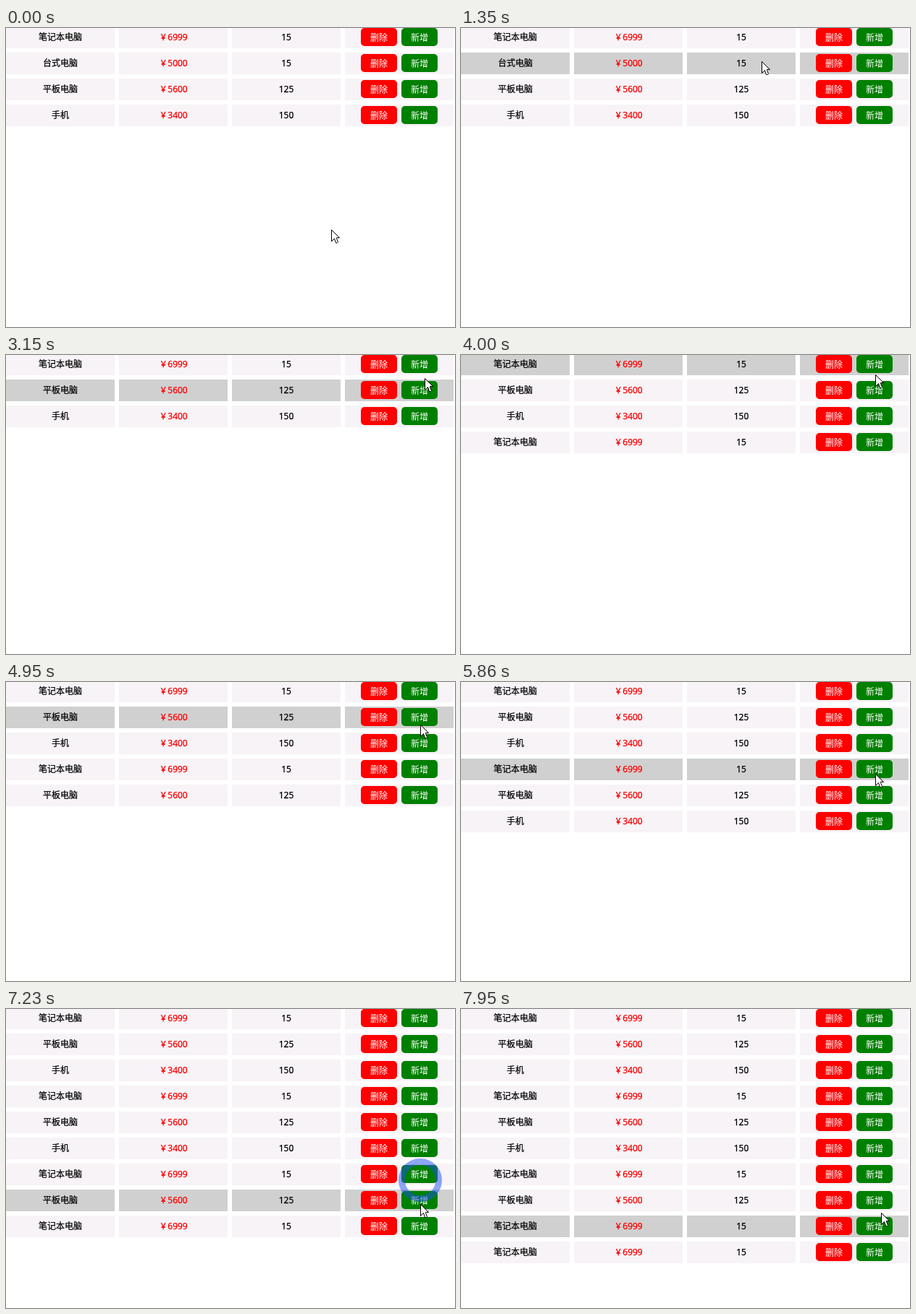
An HTML page that plays this animation: 620x414 px, repeating every 8000 ms.

```html
<!DOCTYPE html>
<html lang="zh-CN">
<head>
<meta charset="utf-8">
<style>
  html, body { margin: 0; width: 100%; height: 100%; overflow: hidden; background: #fff; }
  #stage {
    position: relative; width: 620px; height: 414px; overflow: hidden;
    font: 12px/30px "Noto Sans", "Noto Sans CJK SC", "Noto Sans CJK", sans-serif;
    color: #000; text-align: center; cursor: default;
  }
  .row { position: absolute; left: 0; display: flex; gap: 6px; }
  .cell { position: relative; width: 150px; height: 30px; background: #f7f3f7; -webkit-text-stroke: .25px; }
  .hover .cell { background: #d0d0d0; }
  .price { color: red; }
  .yen { display: inline-block; width: 12px; }
  .btn {
    position: absolute; top: 2px; width: 50px; height: 25px;
    line-height: 27px; border-radius: 5px; color: #fff; -webkit-text-stroke: 0;
  }
  .del { left: 22px; background: red; }
  .add { left: 78px; background: green; }
  svg { position: absolute; left: 0; top: 0; }
</style>
</head>
<body>
<div id="stage">
  <div id="list"></div>
  <svg width="620" height="414">
    <circle id="ripple" fill="none" stroke="#1e50f0" stroke-opacity=".5"/>
    <path id="pointer" d="M.5 .5V16.5L4.5 12.5L6.5 18.5H8.5L9.5 17.5L7.5 12.5V11.5H11.5Z" fill="#fff" stroke="#000"/>
  </svg>
</div>
<script>
const LOOP = 8000, PITCH = 36, TOP = -2, HEIGHT = 30;
const $ = id => document.getElementById(id);

const goods = [
  ['笔记本电脑', 6999, 15],
  ['台式电脑', 5000, 15],
  ['平板电脑', 5600, 125],
  ['手机', 3400, 150]
];

const removal = { at: 2000, row: 1 };
const adds = [[3750, 0], [4460, 1], [5470, 2], [6070, 3], [6510, 4], [7070, 6], [7630, 8]]
  .map(([at, row]) => ({ at, row }));
const clicks = [removal, ...adds];

// The pointer lands a little lower on each of the first rows.
const aimY = row => 13 + row * PITCH + 2 * Math.min(row, 4);

// Between two adds it travels down at 10 ms per pixel, or faster if time is short.
const descent = adds.slice(1).map(({ at, row }, i) => {
  const prev = adds[i], y = aimY(row), end = at - 220;
  const start = Math.max(prev.at + 10, end - 10 * (y - aimY(prev.row)));
  return { start, end, x: 572, y };
});

const moves = [
  { start: 120, end: 910, x: 437, y: 21 },
  { start: 1200, end: 1350, x: 415, y: 46 },
  { start: 1350, end: 1750, x: 515, y: 49 },
  { start: 2830, end: 3150, x: 578, y: 32 },
  { start: 3150, end: 3260, x: 572, y: aimY(0) },
  ...descent,
  { start: 7730, end: 7950, x: 580, y: 282 }
];

function pointerAt(t) {
  let x = 449, y = 279;
  for (const m of moves) {
    if (t <= m.start) break;
    const k = Math.min(1, (t - m.start) / (m.end - m.start));
    x += (m.x - x) * k;
    y += (m.y - y) * k;
  }
  return [Math.round(x), Math.round(y)];
}

function itemsAt(t) {
  const items = goods.slice();
  for (const click of clicks) {
    if (t < click.at + 50) break;
    if (click === removal) items.splice(click.row, 1);
    else items.push(items[click.row]);
  }
  return items;
}

// In the gap between two rows, the row left last stays lit.
function hoverAt(t, count) {
  for (let s = t; s >= 0; s -= 5) {
    const y = pointerAt(s)[1] - TOP;
    const row = Math.floor(y / PITCH);
    if (row >= count) return -1;
    if (y - row * PITCH < HEIGHT) return row;
  }
  return -1;
}

const rowHtml = ([name, price, stock], i, hover) => `
  <div class="row ${i === hover ? 'hover' : ''}" style="top:${TOP + i * PITCH}px">
    <div class="cell">${name}</div>
    <div class="cell price"><span class="yen">¥</span>${price}</div>
    <div class="cell">${stock}</div>
    <div class="cell"><div class="btn del">删除</div><div class="btn add">新增</div></div>
  </div>`;

// A disc grows, then opens from its centre until nothing is left.
function drawRipple(t) {
  const click = clicks.find(c => t >= c.at && t < c.at + 205);
  $('ripple').style.display = click ? '' : 'none';
  if (!click) return;
  const age = t - click.at;
  const [x, y] = pointerAt(click.at);
  const outer = Math.min(30, 15 + age / 4);
  const inner = Math.max(0, (age - 55) / 5);
  const set = (name, value) => $('ripple').setAttribute(name, value);
  set('cx', x);
  set('cy', y);
  set('r', (outer + inner) / 2);
  set('stroke-width', outer - inner);
}

let shown = '';
function frame() {
  const t = performance.now() % LOOP;
  const items = itemsAt(t);
  const hover = hoverAt(t, items.length);
  const html = items.map((item, i) => rowHtml(item, i, hover)).join('');
  if (html !== shown) $('list').innerHTML = shown = html;
  drawRipple(t);
  $('pointer').setAttribute('transform', `translate(${pointerAt(t)})`);
  requestAnimationFrame(frame);
}
frame();
</script>
</body>
</html>
```
